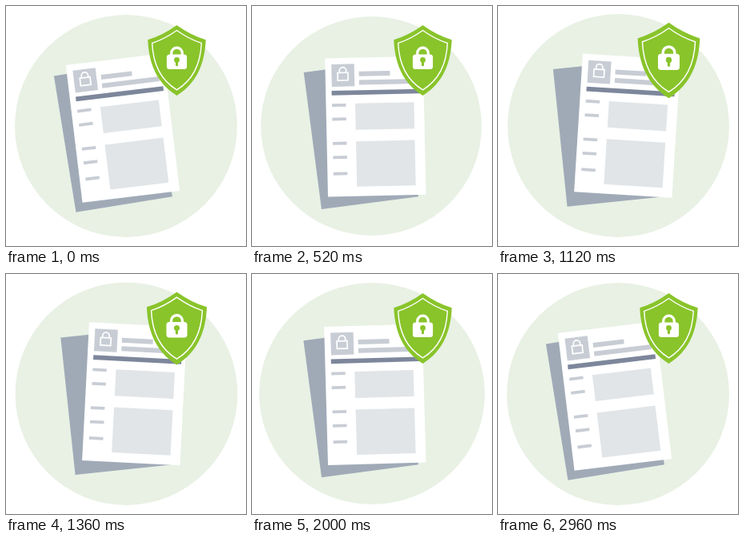
An HTML page with a canvas for the animation above (3000 ms loop, 300 by 300 pixels).

```html
<!DOCTYPE html>
<html lang="en">
<head>
<meta charset="utf-8">
<title>Secure document</title>
<style>
  html, body { margin: 0; width: 100%; height: 100%; overflow: hidden; background: #fff; }
  canvas { display: block; width: 100vw; height: 100vh; }
</style>
</head>
<body>
<canvas id="stage"></canvas>
<script>
const SIZE = 300, LOOP = 3000, STEP = 40;
const canvas = document.getElementById('stage');
const ctx = canvas.getContext('2d');

const color = {
  blob: '#e8f1e4', back: '#a0aab7', page: '#fff', bar: '#c8cdd5',
  block: '#e1e5e8', rule: '#7d879b', shield: '#89c42b'
};

// time, left, right, top, bottom of the soft background disc
const blobKeys = [
  [0, 11, 289, 11, 289],
  [520, 11, 287, 13, 287],
  [800, 10, 288, 12, 288],
  [1120, 12, 289, 10, 289],
  [1640, 11, 290, 11, 289],
  [2000, 9, 291, 11, 288],
  [2360, 9, 291, 10, 288],
  [3000, 11, 289, 11, 289]
];

const mix = (a, b, p) => a + (b - a) * p;
const clamp = p => Math.max(0, Math.min(1, p));
const rad = deg => deg * Math.PI / 180;

// cubic-bezier(.42, 0, .58, 1)
function easeInOut(x) {
  x = clamp(x);
  let lo = 0, hi = 1;
  for (let i = 0; i < 24; i++) {
    const s = (lo + hi) / 2, r = 1 - s;
    if (3 * r * r * s * 0.42 + 3 * r * s * s * 0.58 + s * s * s < x) lo = s;
    else hi = s;
  }
  return lo * lo * (3 - 2 * lo);
}

// rises from a to b, falls back from b to c
function swing(t, a, b, c) {
  return t < b ? easeInOut((t - a) / (b - a)) : 1 - easeInOut((t - b) / (c - b));
}

function rect(fill, x, y, w, h) {
  ctx.fillStyle = fill;
  ctx.fillRect(x, y, w, h);
}

function drawBlob(t) {
  const i = Math.max(1, blobKeys.findIndex(k => k[0] > t));
  const a = blobKeys[i - 1], b = blobKeys[i];
  const p = easeInOut((t - a[0]) / (b[0] - a[0]));
  const [l, r, top, bot] = [1, 2, 3, 4].map(n => mix(a[n], b[n], p));
  const c = SIZE / 2, q = Math.PI / 2;
  ctx.fillStyle = color.blob;
  ctx.beginPath();
  ctx.ellipse(c, c, r - c, bot - c, 0, 0, q);
  ctx.ellipse(c, c, c - l, bot - c, 0, q, 2 * q);
  ctx.ellipse(c, c, c - l, c - top, 0, 2 * q, 3 * q);
  ctx.ellipse(c, c, r - c, c - top, 0, 3 * q, 4 * q);
  ctx.fill();
}

function drawBackPage(p) {
  ctx.save();
  ctx.translate(208, 238.2);
  ctx.rotate(rad(mix(-9.2, -5.85, p)));
  rect(color.back, -122.1, -172.5, 122.1, 172.5);
  ctx.restore();
}

function drawPageLock() {
  ctx.strokeStyle = '#fff';
  ctx.lineWidth = 1.7;
  ctx.strokeRect(15.4, 18.4, 12.9, 9.5);
  ctx.beginPath();
  ctx.moveTo(17.7, 18.4);
  ctx.lineTo(17.7, 15.9);
  ctx.arc(21.9, 15.9, 4.2, Math.PI, 0);
  ctx.lineTo(26.1, 18.4);
  ctx.stroke();
}

function drawPage(p) {
  ctx.save();
  ctx.translate(169, 236.8);
  ctx.rotate(rad(mix(-6.9, 3.65, p)));
  ctx.translate(-74, -173);
  rect(color.page, 0, 0, 122.5, 173);
  rect(color.bar, 7.8, 7.7, 28.5, 28);
  drawPageLock();
  rect(color.bar, 42, 17.3, 38.8, 6);
  rect(color.bar, 42, 28, 72, 6);
  rect(color.rule, 7.4, 40.8, 110.2, 5.7);
  for (const y of [57, 74.4, 104.7, 122.2, 142.6]) rect(color.bar, 7.4, y, 17.5, 3.8);
  rect(color.block, 36.5, 57.2, 73.5, 33);
  rect(color.block, 36.5, 104.6, 73.5, 56.6);
  ctx.restore();
}

// right half of a shield, mirrored about x = 0
function crest(top, dipX, dipY, sideX, sideY, bx1, by1, bx2, by2, tip) {
  ctx.beginPath();
  ctx.moveTo(0, top);
  ctx.quadraticCurveTo(dipX, dipY, sideX, sideY);
  ctx.bezierCurveTo(bx1, by1, bx2, by2, 0, tip);
  ctx.bezierCurveTo(-bx2, by2, -bx1, by1, -sideX, sideY);
  ctx.quadraticCurveTo(-dipX, dipY, 0, top);
  ctx.closePath();
}

function drawShield(t) {
  const s = 1 + 0.073 * swing(t, 640, 1120, 1600);
  ctx.save();
  ctx.translate(213.5, 68.2);
  ctx.scale(s, s);
  ctx.translate(0, -68.2);

  crest(24, 17, 36.3, 36.2, 42.3, 35.2, 70, 26, 96, 112);
  ctx.fillStyle = color.shield;
  ctx.fill();
  crest(30.5, 15, 41.3, 30.8, 46.4, 29.8, 70, 22, 91.5, 104.8);
  ctx.strokeStyle = '#fff';
  ctx.lineWidth = 1.4;
  ctx.stroke();

  ctx.lineWidth = 3.2;
  ctx.beginPath();
  ctx.moveTo(-6.8, 62);
  ctx.lineTo(-6.8, 58.9);
  ctx.arc(0, 58.9, 6.8, Math.PI, 0);
  ctx.lineTo(6.8, 62);
  ctx.stroke();
  ctx.fillStyle = '#fff';
  ctx.beginPath();
  ctx.roundRect(-12.6, 60.4, 25.2, 18.7, 3.5);
  ctx.fill();

  ctx.fillStyle = color.shield;
  ctx.beginPath();
  ctx.arc(0, 67.5, 3.4, 0, 2 * Math.PI);
  ctx.fill();
  ctx.beginPath();
  ctx.roundRect(-1.5, 67.5, 3, 7.8, 1.2);
  ctx.fill();
  ctx.restore();
}

function draw(now) {
  const w = Math.round(innerWidth * devicePixelRatio);
  const h = Math.round(innerHeight * devicePixelRatio);
  if (canvas.width !== w || canvas.height !== h) {
    canvas.width = w;
    canvas.height = h;
  }
  const t = Math.floor((now % LOOP) / STEP) * STEP;
  const tilt = swing(t, 0, 1000, LOOP);
  ctx.setTransform(w / SIZE, 0, 0, h / SIZE, 0, 0);
  rect('#fff', 0, 0, SIZE, SIZE);
  drawBlob(t);
  drawBackPage(tilt);
  drawPage(tilt);
  drawShield(t);
}

let start = null;
function tick() {
  const now = performance.now();
  if (start === null) start = now;
  draw(now - start);
  requestAnimationFrame(tick);
}
tick();
</script>
</body>
</html>
```
